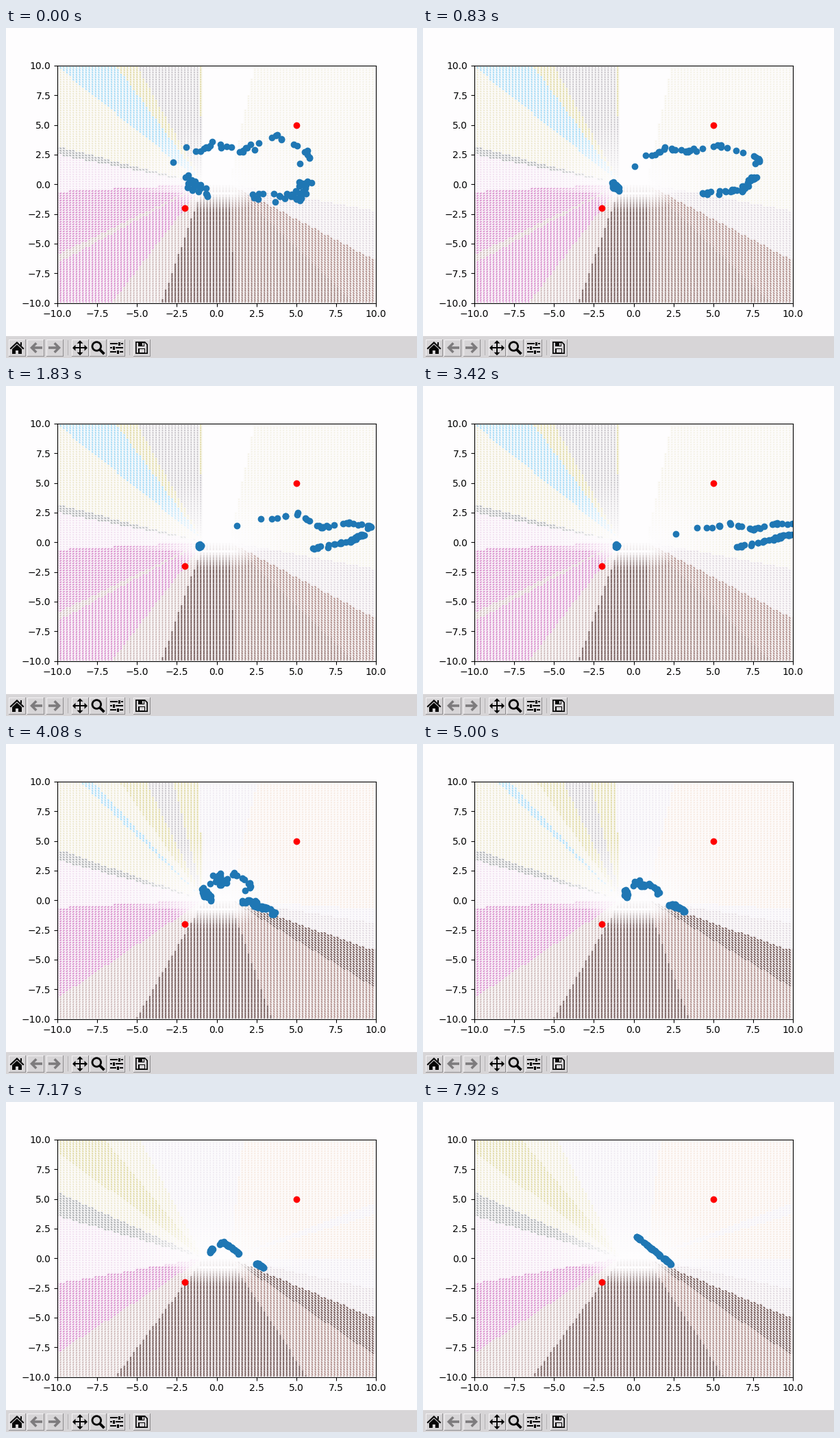
Animation, 600 px wide and 482 px high, one loop 8 s. Source, as a matplotlib script:

```python
import numpy as np
import matplotlib.pyplot as plt
from matplotlib.animation import FuncAnimation
from matplotlib.colors import to_rgb
from matplotlib.patches import Circle, Polygon, Rectangle

W, H = 600, 482
FRAMES, LOOP_MS = 96, 8000
LEFT, TOP, AX_W, AX_H = 75, 55, 465, 346.5
PAPER, BAR, INK, FADED = "#fefdfe", "#d7d5d7", "#060606", "#7d7b7d"
rng = np.random.default_rng(4)

# ---------------------------------------------------------------- arrow field
# colour and strength; the strength also sets the arrow length
STYLES = {
    "blank": ("#ffffff", 0), "pale": ("#d8d0a0", 0.3), "mauve": ("#cfc4d8", 0.35),
    "peach": ("#e8c0a0", 0.35), "cream": ("#d0c47c", 0.4), "olive": ("#c4b850", 0.55),
    "sky": ("#60c0ee", 0.6), "grey": ("#7a737e", 0.45), "slate": ("#686d70", 0.6),
    "blush": ("#dcaed8", 0.4), "magenta": ("#c452b0", 0.68), "sand": ("#a98684", 0.6),
    "mist": ("#b8a6b4", 0.45), "rose": ("#90605a", 0.75), "brown": ("#7d554f", 0.78),
    "dark": ("#5a3a38", 0.9),
}
# Each field is a fan of sectors: start angle in degrees -> style
FANS = [
    {-90: "dark", -88: "brown", -52: "rose", -35: "mist", -14: "pale", 81: "blank",
     90.5: "olive", 92: "grey", 113: "olive", 119: "sky", 133: "cream", 161: "slate",
     165: "blush", 184: "magenta", 213: "sand", 216: "magenta", 240: "sand", 255: "dark"},
    {-90: "dark", -75: "rose", -39: "dark", -25: "mist", -12: "mauve", -5: "peach",
     80: "mauve", 92: "olive", 101: "grey", 110: "olive", 118: "cream", 125: "sky",
     128: "cream", 155: "slate", 160: "blush", 184: "magenta", 222: "sand", 247: "dark"},
    {-90: "dark", -64: "rose", -42: "dark", -29: "mist", -16: "mauve", 0: "peach",
     22: "mauve", 27: "peach", 85: "mauve", 112: "cream", 122: "olive", 136: "cream",
     149: "slate", 159: "blush", 193: "magenta", 221: "sand", 241: "dark"},
]


def field(fan):
    """Raster of a 100 x 100 grid of short arrows, styled by sector."""
    starts = np.array(list(fan))
    tones = np.array([to_rgb(STYLES[s][0]) for s in fan.values()])
    strengths = np.array([STYLES[s][1] for s in fan.values()])
    mids = np.radians((starts + np.append(starts[1:], 270)) / 2)

    cols, rows = AX_W, 347
    step_x, step_y = AX_W / 100, AX_H / 100
    px, py = np.meshgrid(np.arange(cols) + 0.5, rows - np.arange(rows) - 0.5)
    ix, iy = np.clip(np.rint([px / step_x, py / step_y]), 0, 99)
    x, y = ix / 5 - 10, iy / 5 - 10

    # the sectors meet along a short segment rather than in one point
    x = x - np.clip(x, -0.8, 0.8)
    theta = (np.degrees(np.arctan2(y, x)) + 90) % 360 - 90
    sector = np.searchsorted(starts, theta, side="right") - 1
    strength = strengths[sector]
    reach = np.hypot(x, y)
    fade = np.clip(np.where(y > -0.6, reach / 5, (reach - 0.8) / 1.5), 0, 1)

    tilt = np.arctan2(2 * np.sin(mids), np.cos(mids))[sector]
    c, s = np.cos(tilt), np.sin(tilt)
    dx, dy = px - ix * step_x, py - iy * step_y
    along, across = abs(dx * c + dy * s), abs(dy * c - dx * s)
    dash = np.clip(1.1 + 1.3 * strength - along, 0, 1) * np.clip(1.3 - across, 0, 1)
    return np.dstack([tones[sector], strength * fade * (0.13 + 0.87 * dash)])


FIELDS = [field(fan) for fan in FANS]
SWITCHES = (42, 86)

# ------------------------------------------------------------------ particles
# Every particle keeps its place on a curve through ten key points.
PLACE = np.concatenate([rng.uniform(0, 1, 22), rng.uniform(1.8, 6.3, 34),
                        rng.uniform(7, 9, 38)])
NOISE = rng.normal(0, 1, (len(PLACE), 2))


def pose(points, spread):
    """Particles along the curve, in stage pixels."""
    x, y = np.transpose(points)
    steps = np.arange(len(x))
    curve = [np.interp(PLACE, steps, x), np.interp(PLACE, steps, y)]
    return np.transpose(curve) + spread * NOISE


SPREAD = pose([(296, 242), (264, 222), (245, 197), (300, 168), (345, 176),
               (403, 158), (444, 186), (434, 222), (428, 248), (358, 241)], 4.5)
ARC = pose([(286, 236), (277, 228), (310, 202), (352, 175), (385, 179),
            (440, 172), (492, 192), (484, 215), (466, 237), (405, 240)], 2)
DRIFT = pose([(283, 234), (282, 233), (338, 204), (425, 186), (460, 206),
              (505, 200), (533, 205), (522, 216), (503, 227), (445, 237)], 1.2)
FAR = pose([(283, 234), (282, 233), (370, 216), (448, 201), (482, 209),
            (521, 200), (556, 203), (538, 216), (512, 224), (455, 235)], 1)
MOON = pose([(300, 227), (287, 214), (299, 205), (312, 190), (314, 203),
             (336, 189), (358, 207), (344, 228), (368, 237), (395, 246)], 2.5)
SHRUNK = pose([(296, 222), (299, 216), (311, 209), (317, 204), (322, 208),
               (330, 214), (336, 218), (366, 237), (371, 239), (378, 242)], 0.6)
LINE = pose(np.linspace((311, 196), (362, 237), 10), 0.4)
KEYS = [(0, SPREAD), (9, ARC), (21, DRIFT), (30, FAR), (41, FAR),
        (48, MOON), (72, SHRUNK), (85, SHRUNK), (95, LINE)]


def particles(frame):
    """Data coordinates of all particles."""
    for (a, p), (b, q) in zip(KEYS, KEYS[1:]):
        if frame <= b:
            t = (frame - a) / (b - a)
            if q is SHRUNK:
                t = 1 - (1 - t) ** 1.6
            xy = p + t * (q - p)
            break
    return (xy[:, 0] - LEFT) * 20 / AX_W - 10, 10 - (xy[:, 1] - TOP) * 20 / AX_H


# ---------------------------------------------------------------------- stage
fig = plt.figure(figsize=(W / 100, H / 100), dpi=100, facecolor=PAPER)
ax = fig.add_axes([LEFT / W, 1 - (TOP + AX_H) / H, AX_W / W, AX_H / H])
ax.set_facecolor(PAPER)
arrows = ax.imshow(FIELDS[0], extent=(-10, 10, -10, 10), aspect="auto",
                   interpolation="nearest")
ax.set(xlim=(-10, 10), ylim=(-10, 10))
ticks = np.arange(-10, 10.1, 2.5)
ax.set_xticks(ticks)
ax.set_yticks(ticks)
dots, = ax.plot([], [], "o", color="#1f77b4", ms=6)
ax.plot([5, -2], [5, -2], "o", color="red", ms=6)

ui = fig.add_axes([0, 0, 1, 32 / H])
ui.set(xlim=(0, W), ylim=(H, H - 32))
ui.axis("off")


def box(x, y, w, h, color):
    ui.add_patch(Rectangle((x, y), w, h, fc=color, ec="none"))


def shape(points, color=INK):
    ui.add_patch(Polygon(points, fc=color, ec="none"))


def button(x):
    box(x, 455, 25, 25, "#8f8d8f")
    box(x, 455, 24, 24, "#f4f2f4")
    box(x + 1, 456, 23, 23, BAR)


def arrow(cx, side):
    half = [(-9, 0), (-1, -8), (1.5, -5.5), (-2.3, -1.8), (9, -1.8)]
    outline = half + [(x, -y) for x, y in half[:0:-1]]
    shape([(cx + side * x, 467 + y) for x, y in outline], FADED)


def home():
    shape([(5.5, 468), (16, 458), (26.5, 468), (25, 469.5), (16, 461), (7, 469.5)])
    shape([(9, 469), (16, 462.5), (23, 469), (23, 476), (9, 476)])
    box(14, 471, 4, 5, BAR)
    box(20.5, 459, 2.5, 5, INK)


def move():
    box(99, 466, 18, 2.4, INK)
    box(106.8, 458, 2.4, 18, INK)
    for ux, uy in ((1, 0), (-1, 0), (0, 1), (0, -1)):
        shape([(108 + ux * a - uy * b, 467.2 + uy * a + ux * b)
               for a, b in ((11, 0), (6.5, -4.5), (6.5, 4.5))])


def zoom():
    ui.add_patch(Circle((132.3, 465), 6.3, fc="none", ec=INK, lw=2))
    ui.plot([137.5, 142], [470.3, 474.8], color=INK, lw=2.8)


def sliders():
    for y, knob in ((461, 164), (467, 156), (473, 162)):
        box(152, y - 1, 19, 2, INK)
        box(knob - 1, y - 2.8, 5, 5.6, BAR)
        box(knob, y - 2.5, 3, 5, INK)


def disk():
    shape([(189, 458), (203, 458), (207, 462), (207, 476), (189, 476)])
    shape([(190.7, 459.7), (202.3, 459.7), (205.3, 462.7), (205.3, 474.3),
           (190.7, 474.3)], BAR)
    box(193, 459, 9, 5.5, INK)
    box(198.5, 460, 2, 3.5, BAR)
    box(193, 467.5, 10, 8, INK)
    box(194.5, 469, 7, 5.3, BAR)


box(0, 450, W, 32, BAR)
for left in (4, 31, 59, 96, 122, 149, 186):
    button(left)
for left in (90, 180):
    box(left, 456, 1, 22, "#b4b2b4")
arrow(44, 1)
arrow(71, -1)
for icon in (home, move, zoom, sliders, disk):
    icon()


def update(frame):
    arrows.set_data(FIELDS[sum(frame >= s for s in SWITCHES)])
    dots.set_data(*particles(frame))
    return arrows, dots


anim = FuncAnimation(fig, update, frames=FRAMES, interval=LOOP_MS / FRAMES,
                     repeat=True, repeat_delay=0)
plt.show()
```
